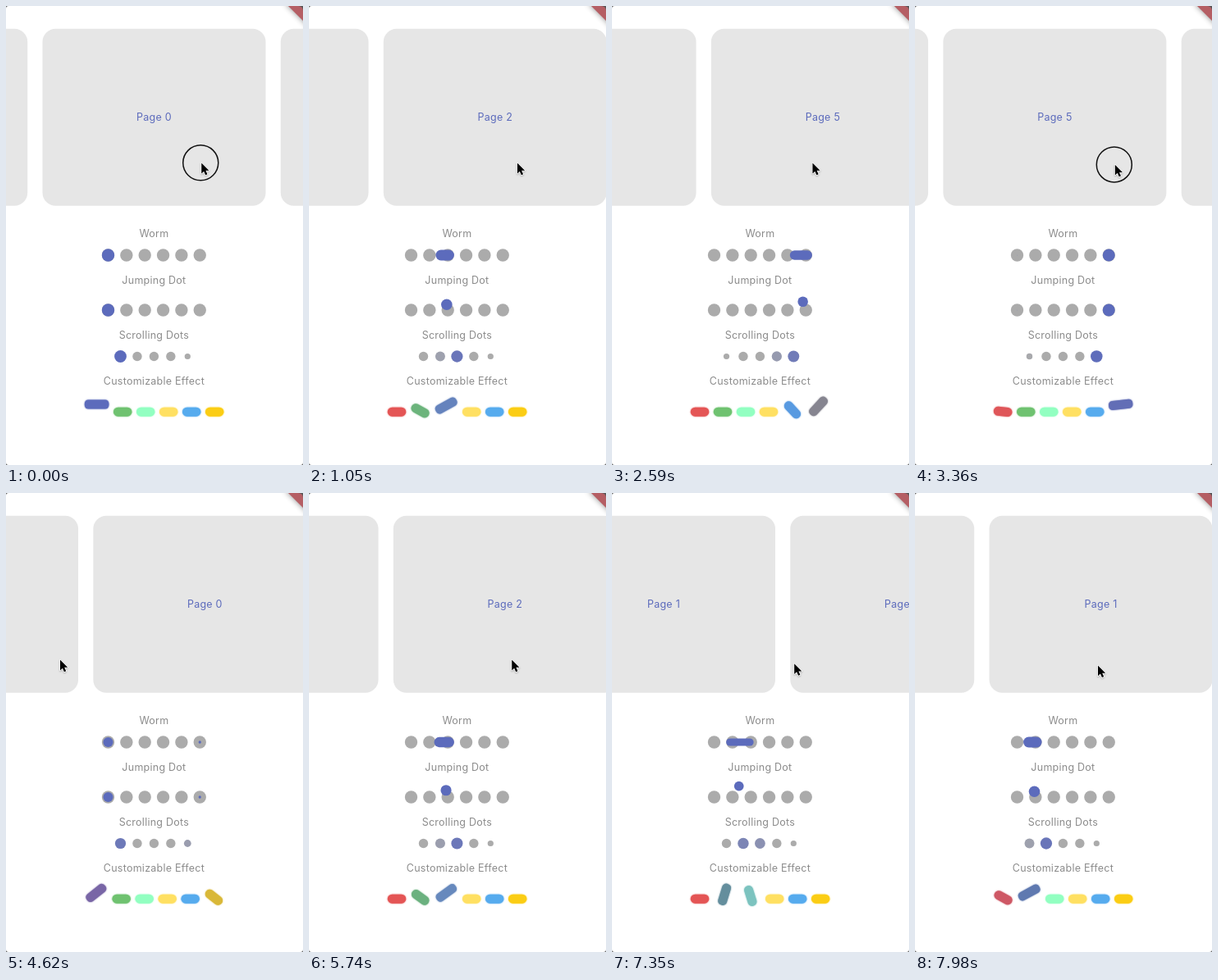
These frames come from a looping animation (362 px wide and 560 px high, 8000 ms). An HTML page with a canvas:

```html
<!DOCTYPE html>
<html lang="en">
<head>
<meta charset="utf-8">
<title>Page indicators</title>
<style>
  html, body { margin: 0; width: 100%; height: 100%; overflow: hidden; background: #fff; }
  canvas { display: block; width: 362px; height: 560px; }
</style>
</head>
<body>
<canvas></canvas>
<script>
const W = 362, H = 560, LOOP = 8000, COUNT = 6, PAGE_STEP = 290.3;
const INDIGO = '#5c6bbc', GREY = '#ababab';
const PILL_COLORS = ['#e45555', '#6fc270', '#92ffc1', '#ffe062', '#56abee', '#fbcd14'];

const canvas = document.querySelector('canvas');
const ctx = canvas.getContext('2d');
const ratio = window.devicePixelRatio || 1;
canvas.width = W * ratio;
canvas.height = H * ratio;

const clamp = v => Math.max(0, Math.min(1, v));
const lerp = (a, b, k) => a + (b - a) * k;
const smooth = k => k * k * (3 - 2 * k);
const channels = hex => [1, 3, 5].map(i => parseInt(hex.slice(i, i + 2), 16));
const mix = (a, b, k) => {
  const end = channels(b);
  return `rgb(${channels(a).map((v, i) => Math.round(lerp(v, end[i], k)))})`;
};

// Swipes: quick flicks at an even pace, plus one slow drag across the wrap-around
const FLICK = 84, SLOP = 28;
const forward = start => ({ start, release: start + FLICK, from: 254, to: 205, speed: 4, drop: 0 });
const backward = start => ({ start, release: start + FLICK, from: 173, to: 223, speed: 4, drop: 2.3 });
const slowDrag = { start: 3112, release: 4520, from: 282, to: 66, speed: 0, drop: 12 };
const series = (make, start, gap, n) => Array.from({ length: n }, (_, i) => make(start + i * gap));
const swipes = [
  forward(-26), ...series(forward, 740, 532, 4), slowDrag,
  ...series(forward, 4950, 505, 3), ...series(backward, 6418, 730, 3),
];

const dragged = (s, t) => clamp((t - s.start) / (s.release - s.start));

function swipeProgress(s, t) {
  const moved = Math.abs(s.to - s.from) * dragged(s, t);
  const share = Math.max(0, moved - SLOP) / PAGE_STEP;
  if (t < s.release) return share;
  // Overdamped page spring with two decay rates
  const slow = 9.08, fast = 22, u = (t - s.release) / 1000, rest = 1 - share;
  const b = (s.speed - slow * rest) / (fast - slow);
  return 1 - (rest - b) * Math.exp(-slow * u) - b * Math.exp(-fast * u);
}

const pageAt = t => swipes.reduce(
  (sum, s) => sum + Math.sign(s.from - s.to) * swipeProgress(s, t), 0);

function pointerAt(t) {
  const i = swipes.findLastIndex(s => s.start <= t);
  const s = swipes[i], next = swipes[i + 1] || s;
  const back = smooth(clamp((t - s.release - 110) / 120));
  return {
    pressed: t < s.release,
    x: lerp(lerp(s.from, s.to, dragged(s, t)), next.from, back),
    y: swipes.reduce((y, s) => y + s.drop * dragged(s, t), 191),
  };
}

function circle(x, y, r, color) {
  if (r <= 0) return;
  ctx.fillStyle = color;
  ctx.beginPath();
  ctx.arc(x, y, r, 0, 7);
  ctx.fill();
}

function box(x, y, w, h, r, color) {
  ctx.fillStyle = color;
  ctx.beginPath();
  ctx.roundRect(x, y, w, h, r);
  ctx.fill();
}

function label(text, x, y, color) {
  ctx.fillStyle = color;
  ctx.fillText(text, x, y);
}

function drawPages(page) {
  const nearest = Math.round(page);
  for (let n = nearest - 1; n <= nearest + 1; n++) {
    const x = 180.5 + (n - page) * PAGE_STEP;
    box(x - 136, 27.7, 272, 216, 16, '#e6e6e6');
    label('Page ' + (n + COUNT) % COUNT, x, 140, INDIGO);
  }
}

const DOT_R = 7.7, DOT_STEP = 22.35;
const dotX = i => 124.5 + i * DOT_STEP;

function drawDotRow(y, index, f, drawActive) {
  for (let i = 0; i < COUNT; i++) circle(dotX(i), y, DOT_R, GREY);
  if (index < COUNT - 1) return drawActive();
  circle(dotX(index), y, DOT_R * (1 - f), INDIGO);
  circle(dotX(0), y, DOT_R * f, INDIGO);
}

function drawWorm(index, f) {
  const y = 304;
  drawDotRow(y, index, f, () => {
    const left = dotX(index) - DOT_R + DOT_STEP * clamp(2 * f - 1);
    const right = dotX(index) + DOT_R + DOT_STEP * clamp(2 * f);
    const h = 2 * DOT_R * (1 - Math.min(f, 1 - f));
    box(left, y - h / 2, right - left, h, h / 2, INDIGO);
  });
}

function drawJumping(index, f) {
  const y = 371;
  drawDotRow(y, index, f, () => {
    const lift = Math.sin(Math.PI * f);
    const x = dotX(index) + DOT_STEP * (1 - Math.cos(Math.PI * f)) / 2;
    circle(x, y - 14 * lift, DOT_R * (1 - .25 * lift), INDIGO);
  });
}

function drawScrolling(index, f, weight) {
  const y = 427.5, step = 20.45, big = 7.4, mid = 5.7, small = 3.6;
  const x = i => 139.5 + i * step;
  if (index === COUNT - 1) {
    for (let i = 1; i < 4; i++) circle(x(i), y, mid, GREY);
    circle(x(0), y, lerp(small, big, f), mix(GREY, INDIGO, f));
    circle(x(4), y, lerp(big, small, f), mix(INDIGO, GREY, f));
    return;
  }
  const s = clamp(index + f - 2);
  const radii = [lerp(mid, 0, s), lerp(mid, small, s), mid, mid, lerp(small, mid, s), lerp(0, mid, s)];
  radii.forEach((r, i) => {
    const k = weight(i);
    circle(x(i - s), y, r * lerp(1, big / mid, k), mix(GREY, INDIGO, k));
  });
}

function drawPills(weight) {
  let x = 95.8;
  PILL_COLORS.forEach((color, i) => {
    const k = weight(i), w = lerp(22.4, 29.6, k), h = 11;
    const fill = mix(color, INDIGO, k);
    ctx.save();
    ctx.translate(x + w / 2, lerp(495.2, 486, k));
    ctx.rotate(Math.PI * k);
    ctx.shadowColor = fill;
    ctx.shadowBlur = 2 * ratio;
    box(-w / 2, -h / 2, w, h, lerp(5.5, 4.5, k), fill);
    ctx.restore();
    x += w + 5.6;
  });
}

function drawRibbon() {
  ctx.save();
  ctx.shadowColor = 'rgba(0,0,0,.45)';
  ctx.shadowBlur = 7 * ratio;
  ctx.fillStyle = '#b55e64';
  ctx.fill(new Path2D('M340 -4L370 26V-4Z'));
  ctx.restore();
  // Dark corners of the rounded window
  ctx.fillStyle = '#555';
  ctx.fill(new Path2D('M0 0H3Q0 0 0 3ZM362 0H356Q362 0 362 6ZM0 560V557Q0 560 3 560ZM362 560V557Q362 560 359 560Z'));
}

const arrow = new Path2D('M0 0V12.8L2.9 10.1L4.9 14.6L7.2 13.6L5.2 9.2H9.2Z');

function drawPointer({ x, y, pressed }) {
  if (pressed) {
    ctx.strokeStyle = '#111';
    ctx.lineWidth = 1.5;
    ctx.beginPath();
    ctx.arc(x - 1, y + .3, 21.5, 0, 7);
    ctx.stroke();
  }
  ctx.save();
  ctx.translate(x, y + .6);
  ctx.lineJoin = 'round';
  ctx.lineWidth = 1.6;
  ctx.strokeStyle = '#fff';
  ctx.shadowColor = 'rgba(0,0,0,.25)';
  ctx.shadowBlur = 2 * ratio;
  ctx.shadowOffsetY = ratio;
  ctx.stroke(arrow);
  ctx.shadowColor = 'transparent';
  ctx.fillStyle = '#000';
  ctx.fill(arrow);
  ctx.restore();
}

function draw(t) {
  const page = pageAt(t), whole = Math.floor(page), f = page - whole;
  const index = (whole + COUNT) % COUNT;
  const weight = i => i === index ? 1 - f : i === (index + 1) % COUNT ? f : 0;

  ctx.setTransform(ratio, 0, 0, ratio, 0, 0);
  ctx.fillStyle = '#fff';
  ctx.fillRect(0, 0, W, H);
  ctx.font = '12.5px Inter, sans-serif';
  ctx.letterSpacing = '0.25px';
  ctx.textAlign = 'center';

  drawPages(page);
  [['Worm', 282], ['Jumping Dot', 339], ['Scrolling Dots', 406], ['Customizable Effect', 462]]
    .forEach(([text, y]) => label(text, 180.4, y, '#8c8c8c'));
  drawWorm(index, f);
  drawJumping(index, f);
  drawScrolling(index, f, weight);
  drawPills(weight);
  drawRibbon();
  drawPointer(pointerAt(t));
}

const origin = performance.now();
function frame() {
  draw((performance.now() - origin) % LOOP);
  requestAnimationFrame(frame);
}
frame();
</script>
</body>
</html>
```
